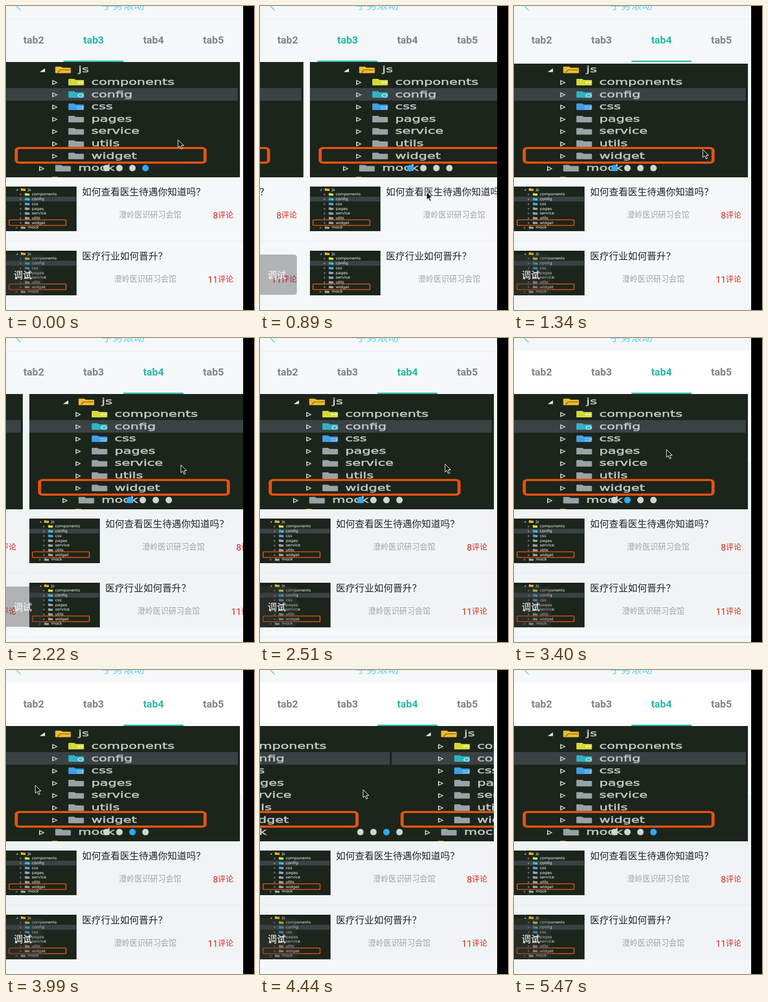
An HTML page for the animation above (6350 ms loop, 457 by 559 pixels).

```html
<!DOCTYPE html>
<html lang="zh">
<head>
<meta charset="utf-8">
<title>手势滚动</title>
<style>
html, body { margin: 0; width: 100%; height: 100%; overflow: hidden; background: #000; }
svg { display: block; }
text { font-family: "Noto Sans CJK SC", "Noto Sans CJK", sans-serif; }
.tab { font: bold 19px Roboto, sans-serif; text-anchor: middle; fill: #808485; }
.tab.on { fill: #27b8a7; }
.tree text { font: 16.4px "DejaVu Sans", sans-serif; fill: #bfc5c3; stroke: #bfc5c3; stroke-width: .55; }
.name { font-size: 17.5px; fill: #222526; }
.mark { font-family: "Noto Sans CJK TC", "Noto Sans CJK", sans-serif; }
.org { font-size: 14.4px; fill: #a0a4a5; }
.note { font-size: 14.2px; fill: #d6241f; text-anchor: end; }
.note .num { font: 16.5px Roboto, sans-serif; }
</style>
</head>
<body>
<svg id="stage" width="457" height="559" viewBox="0 0 457 559"></svg>
<script>
const LOOP = 6350, STEP = 147.8, LAST = 37;
const PITCH = 443, BANNER = 431;

// Each row: step, then the values reached at that step.
const POINTER = [
  [0, 317, 246], [3, 395, 330], [6, 307, 342], [9, 348, 264],
  [11, 170, 245], [14, 313, 234], [17, 341, 232], [18, 400, 230],
  [21, 100, 214], [23, 281, 205], [24, 421, 212], [25, 220, 214],
  [26, 85, 213], [27, 54, 212], [29, 350, 214], [30, 190, 220],
  [31, 110, 250], [32, 286, 324], [36, 350, 538], [37, 355, 580]
];
// Swipe to the next tab, then a pull to the right that springs back.
const PAGES = [
  [0, 0], [4, 0], [5, -150], [6, -351], [7, -430], [8, -PITCH],
  [11, -PITCH], [12, -410], [14, -300], [15, -400], [16, -441], [17, -PITCH], [LAST, -PITCH]
];
// Three swipes through the banner, each easing out.
const SLIDES = [
  [0, 0], [18, 0], [19, -80], [20, -260], [21, -400], [22, -BANNER],
  [24, -BANNER], [25, -620], [26, -830], [27, -2 * BANNER],
  [29, -2 * BANNER], [30, -1050], [31, -1260], [32, -3 * BANNER], [LAST, -3 * BANNER]
];

const rect = (x, y, w, h, fill, more = "") =>
  `<rect x="${x}" y="${y}" width="${w}" height="${h}" fill="${fill}" ${more}/>`;
const text = (x, y, s, cls) => `<text x="${x}" y="${y}" class="${cls}">${s}</text>`;
const picture = (x, y, w, h) => `<use href="#tree" x="${x}" y="${y}" width="${w}" height="${h}"/>`;

const ROWS = [
  ["js", "#efbb2d"], ["components", "#d2db38"], ["config", "#30b3c4"], ["css", "#419fe8"],
  ["pages"], ["service"], ["utils"], ["widget"], ["mock"]
];

function folder(x, y, fill) {
  return `<path d="M${x + 1} ${y - 11}h6l2 2h9q1 0 1 1v8q0 1 -1 1h-17q-1 0 -1 -1v-10q0 -1 1 -1z" fill="${fill}"/>`;
}

function badge(i, y) {
  if (i === 0) return `<path d="M63 ${y}l3-5h12" fill="none" stroke="#6b5518"/>`;
  if (i === 1) return rect(87, y - 6, 3, 3, "#f3f6c0") + rect(91, y - 6, 3, 3, "#f3f6c0");
  if (i === 2) return `<circle cx="91" cy="${y - 3}" r="3" fill="none" stroke="#a9e9ef" stroke-width="1.5"/>`;
  if (i === 3) return `<path d="M86 ${y - 5}h8l-1 4h-7" fill="none" stroke="#b9defa"/>`;
  return "";
}

function treeRow([label, fill = "#98a3a6"], i) {
  const y = 19.5 + 22.6 * i, outer = i === 0 || i === 8;
  const x = outer ? 41 : 57;
  const arrow = i === 0
    ? `<path d="M41 ${y - 1}h6.5v-7z" fill="#e4e8e6"/>`
    : `<path d="M${x} ${y - 8}l5 3.6-5 3.6z" fill="none" stroke="#d5dad8" stroke-width="1.2"/>`;
  return arrow + folder(x + 19, y, fill) + badge(i, y) + text(x + 47, y, label, "");
}

const tree = `<symbol id="tree" viewBox="0 0 285 212" preserveAspectRatio="none"><g class="tree">
  ${rect(0, 0, 285, 212, "#1c251b")}${rect(0, 48, 282.5, 23, "#3b4244")}
  ${ROWS.map(treeRow).join("")}
  ${rect(56, 211, 7, 1, "#c79a24")}
  ${rect(12.5, 158.2, 230, 26.8, "none", 'rx="4" stroke="#e8530f" stroke-width="3.8"')}
</g></symbol>`;

function item(y, name, orgX, count) {
  return picture(0, y, 130, 82) +
    text(140, y + 16, `${name}<tspan class="mark">？</tspan>`, "name") +
    text(orgX, y + 57, "澄岭医识研习会馆", "org") +
    `<text x="419" y="${y + 57}" class="note"><tspan class="num" dy="2">${count}</tspan><tspan dy="-2">评论</tspan></text>` +
    rect(0, y + 100, 437, 1, "#e6eaeb");
}

function page(id, x) {
  const dots = [0, 1, 2, 3].map(i => `<circle cx="${185 + 24 * i}" cy="298" r="6"/>`).join("");
  const slides = [0, 1, 2, 3].map(i => picture(i * BANNER, 0, BANNER, 212)).join("");
  return `<g transform="translate(${x})">
    <svg x="0" y="103" width="${BANNER}" height="212"><g id="slides${id}">${slides}</g></svg>
    <g id="dots${id}">${dots}</g>
    ${item(332, "如何查看医生待遇你知道吗", 208, 8)}
    ${item(450, "医疗行业如何晋升", 199, 11)}
  </g>`;
}

const tabs = [2, 3, 4, 5].map((n, i) => text(51 + 110.4 * i, 69, "tab" + n, "tab")).join("");

document.getElementById("stage").innerHTML = `<defs>${tree}
  <clipPath id="screen"><rect width="437" height="559"/></clipPath></defs>
<g clip-path="url(#screen)">
  ${rect(0, 0, 437, 559, "#f4f8f9")}
  ${rect(0, 103, 437, 430, "#f0f4f5", 'id="shade"')}
  ${rect(431, 103, 6, 125, "#f8fbfb", 'id="edge"')}
  <g id="pages">${page(0, 0)}${page(1, PITCH)}</g>
  ${rect(0, 103, 437, 3, "#f4f8f9", 'id="gap"')}
  ${rect(0, 24, 437, 1, "#e9eeef", 'id="rule"')}
  ${rect(0, 23, 437, 80, "#fefefe", 'id="bar"')}
  <path d="M27 8L17.5 -1.5" stroke="#55cdf6" stroke-width="1.6"/>
  <text x="177" y="5.5" font-size="19.5" font-weight="500" fill="#5fd2f6">手势滚动</text>
  <g id="tabs">${tabs}</g>
  ${rect(106, 100.5, 110.5, 2.5, "#27b8a7", 'id="line"')}
  <path d="M0 457h63a5 5 0 0 1 5 5v64a5 5 0 0 1-5 5H0z" fill="#3c3c3c" fill-opacity=".36"/>
  <text x="14" y="500.5" font-size="17" font-weight="500" fill="#fff">调试</text>
  <path id="pointer" d="M0 0V14.5L3.4 11.4 6 17.2 8.4 16.1 5.9 10.5H10.5Z" fill="#15181a" stroke="#fff"/>
</g>`;

const $ = id => document.getElementById(id);
const show = (id, on) => $(id).setAttribute("visibility", on ? "visible" : "hidden");
const move = (id, x, y = 0) => $(id).setAttribute("transform", `translate(${x} ${y})`);

function at(table, k) {
  const i = Math.max(1, table.findIndex(row => row[0] >= k));
  const a = table[i - 1], b = table[i], f = (k - a[0]) / (b[0] - a[0]);
  return a.slice(1).map((v, j) => v + (b[j + 1] - v) * f);
}

function setDots(id, active) {
  [...$(id).children].forEach((dot, i) => dot.setAttribute("fill", i === active ? "#30a9f6" : "#d2d3d3"));
}

function draw(k) {
  const tab = k < 7 ? 1 : 2;
  const [slide] = at(SLIDES, k);
  move("pages", ...at(PAGES, k));
  move("slides1", slide);
  move("pointer", ...at(POINTER, k));
  setDots("dots1", Math.floor(-slide / BANNER + 0.02));
  [...$("tabs").children].forEach((el, i) => el.classList.toggle("on", i === tab));
  $("line").setAttribute("x", 106 + 110.5 * (tab - 1));
  show("gap", k >= 8 && k < 12);
  show("shade", k >= 12);
  show("bar", k >= 19);
  show("rule", k < 19);
  show("edge", k >= 19);
}

setDots("dots0", 3);
const start = performance.now();
let shown = -1;
function tick() {
  const t = (performance.now() - start) % LOOP;
  const k = Math.min(LAST, Math.floor((t + 3) / STEP));
  if (k !== shown) draw(shown = k);
  requestAnimationFrame(tick);
}
tick();
</script>
</body>
</html>
```
